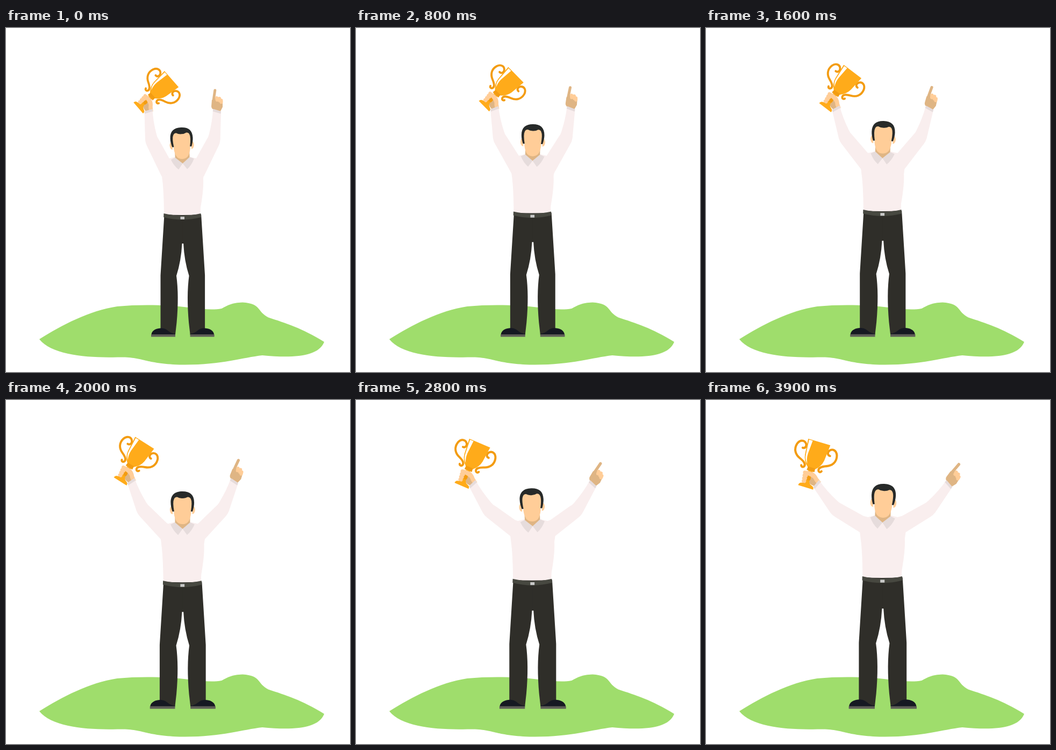
Animation of 640x640 px, one loop 4000 ms. Source, as an HTML page with a canvas:

```html
<!DOCTYPE html>
<html lang="en">
<head>
<meta charset="utf-8">
<title>Champion</title>
<style>
  html, body { margin: 0; width: 100%; height: 100%; overflow: hidden; background: #fff; }
  canvas { display: block; width: 640px; height: 640px; }
</style>
</head>
<body>
<canvas id="stage" width="640" height="640"></canvas>
<script>
const ctx = document.getElementById('stage').getContext('2d');

const LOOP = 4000, STEP = 100, SPAN = LOOP - STEP;
const CENTER = 328.8, FLOOR = 574.5;
const GROWTH = 0.0746, ARM_SWING = 32.2, HEAD_TILT = 2.6;
const SHOULDER = [294, 258], NECK = [328.5, 248];

const color = {
  grass: '#9fdd6c', shirt: '#f9eeee', cuff: '#e6dcdc', pants: '#2f2e29',
  belt: '#474840', buckle: '#c8c8c8', shoe: '#161922', sole: '#5f5e58',
  skin: '#ffcd98', shade: '#dfb584', hair: '#272a29',
  gold: '#ffab1a', darkGold: '#f39c12', white: '#fff'
};

const fill = (c, d) => { ctx.fillStyle = c; ctx.fill(new Path2D(d)); };

function line(c, width, d) {
  ctx.strokeStyle = c;
  ctx.lineWidth = width;
  ctx.lineCap = ctx.lineJoin = 'round';
  ctx.stroke(new Path2D(d));
}

function group(draw) {
  ctx.save();
  draw();
  ctx.restore();
}

function mirror(axis) {
  ctx.translate(2 * axis, 0);
  ctx.scale(-1, 1);
}

function bothSides(axis, draw) {
  group(draw);
  group(() => { mirror(axis); draw(); });
}

function turn([x, y], degrees) {
  ctx.translate(x, y);
  ctx.rotate(degrees * Math.PI / 180);
  ctx.translate(-x, -y);
}

const smooth = u => u * u * (3 - 2 * u);

function ground() {
  fill(color.grass, `M62 579 C105 552 155 526 207 518 C250 514 300 515 340 520
    C365 523 385 525 401 522 C413 516 420 511 440 510.5 C476 513 466 527 488 538.5
    C520 549 550 558 592 584 C581 613 530 614 477 609 C440 613 400 627 329 626.5
    C256 625 257 611 207 612.5 C150 614 85 608 62 579 Z`);
}

function leg() {
  fill(color.pants, `M294.5 347 L329 347 L329 401 L327.5 401 Q326 433 317 461
    Q322 498 317.5 548 L315 570 L287.5 564 V460 Z`);
  fill(color.shoe, 'M270.5 570.5 C271 562 281 558.5 288 558.5 C302 558.5 300 567 315 569 V570.5 Z');
  fill(color.sole, 'M270 570 H315 V574.5 H270 Z');
}

function torso() {
  fill(color.shirt, `M302 243 L314 240 H343 L355.5 243 L369 265 Q368 273 367 280
    Q368 300 362 334 L361.5 346.5 Q328 349.5 294 346.5
    Q293.5 300 290.5 280 Q290 273 288.5 265 Z`);
  fill(color.belt, 'M293.5 345 Q328 353 362.5 345 L363 352 Q328 361 293.2 352 Z');
  fill(color.buckle, 'M324.5 351 h7.5 v5 h-7.5 Z');
}

function sleeve() {
  fill(color.shirt, `M257.5 156 L272.5 151 Q273.5 173 280 198 Q281 203 284 207
    L304.5 244 L310 250 L300 272 L289.5 276 L262 219 Q259.5 214 259 208 Z`);
  fill(color.cuff, 'M257.5 155 L272 150.5 L273 155 L258 159.5 Z');
}

function trophy() {
  bothSides(0, () => line(color.darkGold, 3.8, `M-24.7 17.8 C-20 18 -18.5 13 -21 9.5
    C-25 4 -33 5 -36 14 C-39 25 -33 33 -24 36.5
    C-15 40 -11 44 -13 48 C-14.5 50.5 -17.5 50 -18.3 47.5`));
  fill(color.gold, 'M-20 0 H20 L17.5 28 Q16 39 7 47 H-7 Q-16 39 -17.5 28 Z');
  fill(color.white, 'M-18 1.2 H-11.5 L-13 25 Q-13 35 -9 42 Q-15.5 36 -16 27 Z');
  fill(color.darkGold, 'M-6.5 46 H6.5 L7 52.5 H-7 Z');
  fill(color.gold, `M-4 52 H4 L3 62 Q5 66 3 69 Q3.5 75 10 76.5 Q13.5 77.5 13.5 82
    H-13.5 Q-13.5 77.5 -10 76.5 Q-3.5 75 -3 69 Q-5 66 -3 62 Z`);
  fill(color.darkGold, 'M-3 61 H3 Q5 66 3 69 H-3 Q-5 66 -3 61 Z');
}

function trophyHand() {
  ctx.translate(308, 95);
  ctx.rotate(49 * Math.PI / 180);
  fill(color.shade, 'M-2 60 L10 60 L21 68 L16.7 76 L8 75 L1 72 Z');
  trophy();
  for (let i = 0; i < 4; i++) {
    const y = 57.5 + i * 5;
    line(color.skin, 6, `M${-9 + i * 0.7} ${y} L-5 ${y}`);
  }
  fill(color.skin, `M-9 54.5 Q-2 52.5 5 53.5 Q11 55 15.8 60.5 L23 65.5 L19.5 71
    Q13 69 9 64 Q4 61 -5 61 Z`);
}

function pointingHand() {
  fill(color.shade, `M274.6 134 L268 130 L254.6 138 V147 L258.6 155
    L271.6 152 Q276 149 275.5 145 Z`);
  line(color.shade, 5, 'M268.8 116 L272 138');
  line(color.skin, 6, 'M265.5 130 L265 134 M260.5 131 L260 135.5 M257.2 134.5 L257 138');
}

function arm(swing, hand) {
  turn(SHOULDER, -swing);
  group(hand);
  sleeve();
}

function head() {
  fill(color.shade, 'M315 230 H342 V242 L328.5 252.3 L315 242 Z');
  bothSides(NECK[0], () => {
    fill(color.cuff, 'M315 240.5 L328.5 252 L320.5 263 Q312 256 307 244 Z');
    fill(color.skin, 'M311 211 C304 210 304.5 226 311 225.5 Z');
  });
  fill(color.hair, `M310.5 221 Q307.5 212 307.5 205 C307.5 191 315 185 328.5 185
    C342 185 349.5 191 349.5 205 Q349.5 212 346.5 221 Z`);
  fill(color.skin, `M313.7 221.5 Q310.5 204 313.5 198.5 Q315 195 319 195
    Q323 197.5 328.5 197.3 Q334 197.5 338 195 Q342 195 343.5 198.5
    Q346.5 204 343.3 221.5 L344 223 Q342.5 235 338.5 239.5
    Q334.5 243.7 328.5 243.7 Q322.5 243.7 318.5 239.5 Q314.5 235 313 223 Z`);
}

function headAngle(t) {
  const beat = SPAN / 3;
  const n = Math.min(2, Math.floor(t / beat));
  const sway = 2 * smooth(t / beat - n) - 1;
  return HEAD_TILT * (n % 2 ? -sway : sway);
}

function render(t) {
  const u = t / SPAN;
  const scale = 1 + GROWTH * u;
  const swing = ARM_SWING * smooth(u);

  ctx.fillStyle = color.white;
  ctx.fillRect(0, 0, 640, 640);
  ground();

  group(() => {
    ctx.translate(CENTER, FLOOR);
    ctx.scale(scale, scale);
    ctx.translate(-CENTER, -FLOOR);
    bothSides(CENTER, leg);
    torso();
    group(() => arm(swing, trophyHand));
    group(() => { mirror(CENTER); arm(swing, pointingHand); });
    group(() => { turn(NECK, headAngle(t)); head(); });
  });
}

const start = performance.now();

function tick() {
  const t = (performance.now() - start) % LOOP;
  render(Math.floor(t / STEP) * STEP);
  requestAnimationFrame(tick);
}
tick();
</script>
</body>
</html>
```
